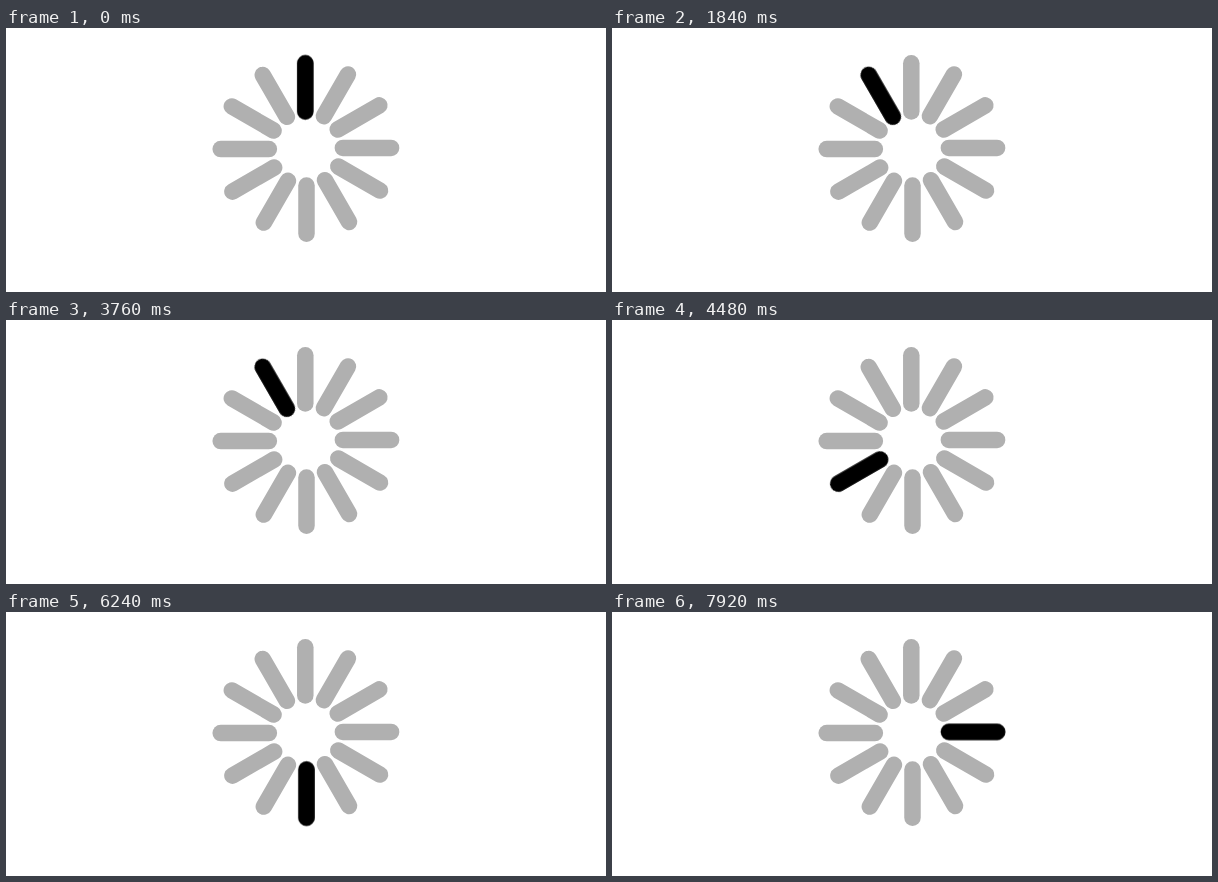
Write an HTML page that moves like this. It is 600 px wide and 264 px high and loops after 8000 ms.

```html
<!DOCTYPE html>
<html lang="en">
<head>
<meta charset="utf-8">
<title>Loading spinner</title>
<style>
  html, body { margin: 0; width: 100%; height: 100%; overflow: hidden; background: #fff; }
  svg { display: block; width: 600px; height: 264px; }
  line { stroke: #b0b0b0; stroke-width: 16.5; stroke-linecap: round; }
  #active { stroke: #000; transform-origin: 0 0; }
</style>
</head>
<body>
<svg viewBox="0 0 600 264">
  <g id="wheel" transform="translate(299.9 120.5)"></g>
</svg>
<script>
  const SPOKES = 12, STEP = 360 / SPOKES;
  const LOOP = 8000, TICKS = 100;
  const wheel = document.getElementById('wheel');

  function addSpoke(angle) {
    const line = document.createElementNS('http://www.w3.org/2000/svg', 'line');
    const attrs = { x1: -0.6, y1: -85.2, x2: -0.6, y2: -37 };
    for (const key in attrs) line.setAttribute(key, attrs[key]);
    line.setAttribute('transform', `rotate(${angle})`);
    return wheel.appendChild(line);
  }

  for (let i = 0; i < SPOKES; i++) addSpoke(i * STEP);

  // The dark spoke jumps one place clockwise every 80 ms.
  const active = addSpoke(0);
  active.id = 'active';
  active.animate(
    [{ transform: 'rotate(0deg)' }, { transform: `rotate(${TICKS * STEP}deg)` }],
    { duration: LOOP, iterations: Infinity, easing: `steps(${TICKS}, end)` }
  );
</script>
</body>
</html>
```
